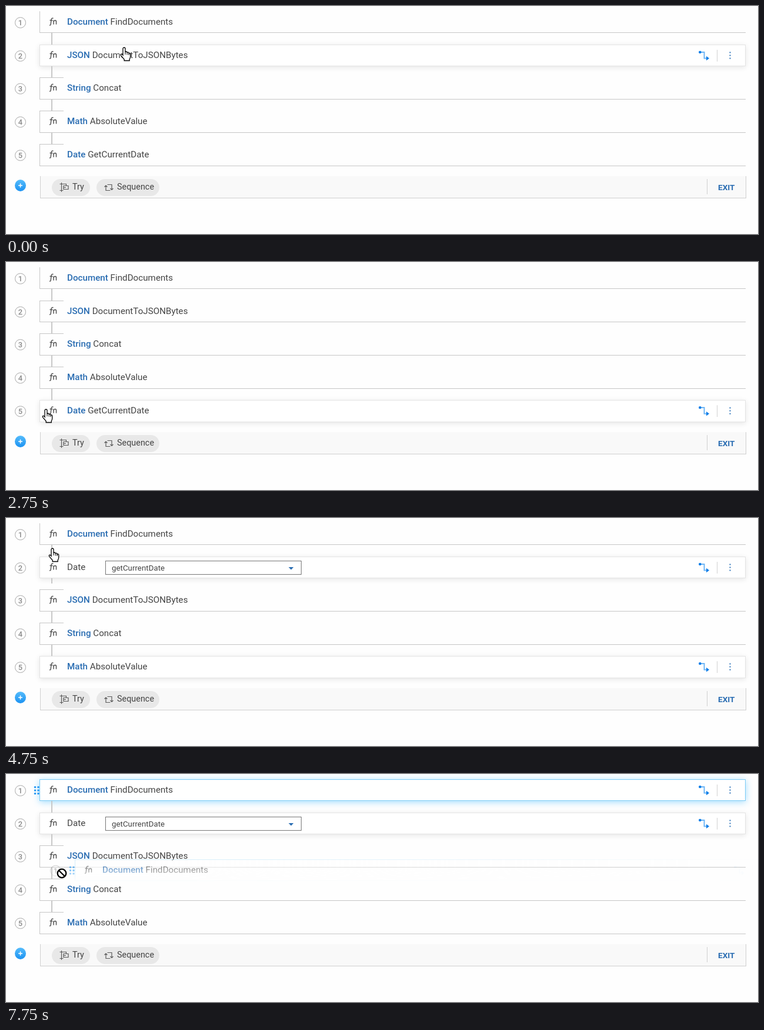
Write an HTML page that moves like this. It is 1280 px wide and 390 px high and loops after 8000 ms.

```html
<!DOCTYPE html>
<html lang="en">
<head>
<meta charset="utf-8">
<title>Reordering steps</title>
<style>
html, body { margin: 0; width: 100%; height: 100%; overflow: hidden; background: #fefefe; }
body { font-family: Roboto, "Open Sans", Arial, sans-serif; color: #444; }
#stage { position: relative; width: 1280px; height: 390px; overflow: hidden; }
#stage div, #stage svg { position: absolute; box-sizing: border-box; }
svg { overflow: visible; fill: none; }
.num { left: 15px; width: 19px; height: 19px; border: 1px solid #a8a8a8; border-radius: 50%;
  font: 500 12.8px/18px Roboto, sans-serif; color: #8a8a8a; text-align: center; }
.link { left: 77px; width: 2px; background: #c8c8c8; }
.row { left: 57px; width: 1202px; border: solid #c6c6c6; border-width: 0 0 1px 1px; }
.row.lid::before { content: ""; position: absolute; left: 0; top: 0; width: 40px; height: 1px; background: #c6c6c6; }
.row.hover { background: #fff; border: 1px solid #e4e4e4; box-shadow: 0 2px 9px rgba(0, 0, 0, .1); }
.row.active { background: #fff; border: 1px solid #7ccbf5; box-shadow: 0 2px 11px rgba(30, 175, 255, .42); }
.inner { left: 57px; width: 1202px; height: 38px; }
.label { left: 47px; top: 0; font-size: 15.2px; line-height: 37px; white-space: pre; }
.label b { font-weight: 500; color: #2a6db2; }
.select { left: 112px; top: 7px; width: 334px; height: 24px; border: 1px solid #767676; background: #fff;
  padding-left: 10px; font-size: 13.333px; line-height: 24px; }
.ghost { left: 0; width: 1280px; height: 60px; opacity: .6;
  mask: linear-gradient(90deg, #000 180px, transparent 1240px), linear-gradient(#000 45%, transparent 82%);
  mask-composite: intersect; }
.ghost .row.active { border-color: #b9e2f8; box-shadow: none; }
.bar { left: 58px; top: 291px; width: 1202px; height: 38px; background: #f9f9f9;
  border: solid #cfcfcf; border-width: 0 1px 1px 1px; }
.pill { top: 296px; height: 29px; border-radius: 15px; background: #e8e8e8;
  font-size: 14.4px; line-height: 27px; padding-left: 35px; }
.exit { left: 1193px; top: 296px; height: 26px; border-left: 1px solid #cfcfcf; padding-left: 18px;
  font: 700 13.6px/29px Roboto, sans-serif; color: #2a6db2; }
.plus { left: 15px; top: 297px; width: 19px; height: 20px; border-radius: 50%;
  background: linear-gradient(#55bcfb, #1c92f2); }
</style>
</head>
<body>
<div id="stage">
  <div id="list"></div>
  <div class="plus"></div>
  <div class="bar"></div>
  <div class="pill" style="left:78px;width:65px">Try</div>
  <div class="pill" style="left:154px;width:107px">Sequence</div>
  <div class="exit">EXIT</div>
  <svg width="1280" height="390" style="left:0;top:0" stroke="#5a5a5a" stroke-width="1.2">
    <path d="M24.5 303.5v7M21 307h7" stroke="#fff" stroke-width="1.5"/>
    <path d="M94.5 302v16M91.5 304.500h11v3M91.5 315.500h6M98 307.500h8v6h-8zM98 310.500h4"/>
    <path d="M172.5 305.5h7.5v8M177.5 315.5H170v-8M177.5 312l2.500 2.500 2.500-2.500M167.500 309.500l2.500-2.500 2.500 2.500"/>
  </svg>
  <div id="drag"></div>
  <svg id="pointer" width="1" height="1"></svg>
</div>
<script>
const LOOP = 8000, STEP = 250, DROP = 4500, SETTLED = 5000;

const first = ["Document", "FindDocuments"], last = ["Date", "GetCurrentDate"];
const middle = [["JSON", "DocumentToJSONBytes"], ["String", "Concat"], ["Math", "AbsoluteValue"]];
const before = [first, ...middle, last];
const after = [first, ["Date"], ...middle];

// Pointer key points: time, x, y
const path = [
  [0, 201, 71], [250, 201, 71], [750, 142, 36], [1250, 101, 129], [1500, 80, 205],
  [2000, 68, 255], [2500, 68, 255], [2750, 68, 252], [3000, 68, 252],
  [3250, 77, 267], [4000, 87, 49], [4250, 87, 49], [4500, 79, 52], [4750, 79, 52],
  [6250, 68, 21], [6500, 68, 21], [6750, 78, 24], [7000, 35, 33], [7750, 95, 170]
];
const drags = [{ row: 4, from: 3250, to: DROP }, { row: 0, from: 7000, to: LOOP }];

const $ = id => document.getElementById(id);
const topOf = i => Math.round(8.8 + 56.8 * i);
const bottomOf = i => Math.round(46.4 + 56.8 * i);

function pointerAt(t) {
  const k = Math.max(1, path.findIndex(p => p[0] >= t));
  const [t0, x0, y0] = path[k - 1], [t1, x1, y1] = path[k];
  const u = (t - t0) / (t1 - t0);
  return { x: Math.round(x0 + (x1 - x0) * u), y: Math.round(y0 + (y1 - y0) * u) };
}

function dots(cols, x, y, gap, r, color) {
  return [...Array(cols * 3).keys()].map(k =>
    `<circle cx="${x + gap * (k % cols)}" cy="${y + gap * Math.floor(k / cols)}" r="${r}" fill="${color}"/>`).join("");
}

const FN = `<svg width="14" height="16" style="left:16px;top:10px" stroke="#555" stroke-width="1.5">
  <path d="M7.500 2q-3-.8-3.400 2l-.9 8.200q-.3 2-2.200 1.500M1.500 5.500h5M8 12.500v-7M8 7.800q.8-2.300 2.500-2.300 2 0 2 2.300v4.700"/></svg>`;
const TOOLS = `<svg width="80" height="38" style="left:1120px;top:0">
  <path d="M4 13h7.500v10.500h4.500" stroke="#6fb6f5" stroke-width="2"/>
  <circle cx="4.300" cy="13" r="2.300" fill="#0d7ee8"/><path d="M15 19.800l5 3.700-5 3.700z" fill="#0d7ee8"/>
  <path d="M33.500 9v20" stroke="#d0d0d0"/>${dots(1, 55.5, 13.5, 5, 1.2, "#4f8ac4")}</svg>`;
const HANDLE = `<svg width="1" height="1" style="left:0;top:0">${dots(2, -7.5, 13.5, 5.5, 1.7, "#2196f3")}</svg>`;
const SELECT = `<div class="select">getCurrentDate<svg width="9" height="5" style="left:311px;top:10px">
  <path d="M0 0h8.500l-4.250 4.500z" fill="#2a6db2"/></svg></div>`;
const HAND = `<path d="M-2 2a2 2 0 0 1 4 0v6a1.700 1.700 0 0 1 3.200 .3v.7a1.600 1.600 0 0 1 3 .5v.7a1.400 1.400 0 0 1 2.500 .8
  v4.500q0 2.500-1.500 4.500v2.500H.2v-2.200L-5 14.200q-1.500-2.400 .3-3 1-.3 2.700 2z" fill="#fff" stroke="#000" stroke-width="1.300"/>
  <path d="M2 8v4M5.200 9v3.500M8.200 10v3" stroke="#000"/>`;
const NO_DROP = `<circle r="7.300" fill="#fff" stroke="#fff" stroke-width="4.500"/>
  <g stroke="#000" stroke-width="2.300"><circle r="7.300"/><path d="M-5-5l10 10"/></g>`;

function rowHtml([name, method], i, y, mode) {
  const label = method ? `<b>${name}</b> ${method}` : name;
  const lid = i && !mode ? "lid" : "";
  return `<div class="num" style="top:${y + 10}px">${i + 1}</div>
    <div class="row ${mode} ${lid}" style="top:${y}px;height:${bottomOf(i) - topOf(i)}px"></div>
    <div class="inner" style="top:${y}px">${FN}<div class="label">${label}</div>
    ${method ? "" : SELECT}${mode ? TOOLS : ""}${mode === "active" ? HANDLE : ""}</div>`;
}

function linkHtml(i, half) {
  const y = bottomOf(i), h = half ? 9 : topOf(i + 1) - y;
  return `<div class="link" style="top:${y}px;height:${h}px"></div>`;
}

function draw(t) {
  const { x, y } = pointerAt(t);
  const items = t < DROP ? before : after;
  const settling = t >= DROP && t < SETTLED;
  const drag = drags.find(d => t >= d.from && t < d.to);
  const moving = drag && t > drag.from;

  const modeOf = i => {
    if (drag && drag.row === i) return "active";
    const over = !drag && y >= topOf(i) && y < bottomOf(i);
    return over || !items[i][1] || (settling && i === 4) ? "hover" : "";
  };
  const rows = items.map((item, i) => rowHtml(item, i, topOf(i), modeOf(i)));
  const links = items.slice(1).map((_, i) => linkHtml(i, settling && i === 1));
  $("list").innerHTML = rows.join("") + links.join("");

  let ghost = "";
  if (moving) {
    const grab = pointerAt(drag.from);
    ghost = `<div class="ghost" style="left:${x - grab.x}px;top:${topOf(drag.row) - 10 + y - grab.y}px">
      ${rowHtml(items[drag.row], drag.row, 10, "active")}</div>`;
  }
  $("drag").innerHTML = ghost;
  $("pointer").innerHTML = moving ? NO_DROP : HAND;
  $("pointer").style.left = x + "px";
  $("pointer").style.top = y + "px";
}

const start = performance.now();
let shown = -1;

function tick() {
  const t = (performance.now() - start) % LOOP;
  const step = Math.floor(t / STEP) * STEP;
  if (step !== shown) draw(shown = step);
  requestAnimationFrame(tick);
}
tick();
</script>
</body>
</html>
```
